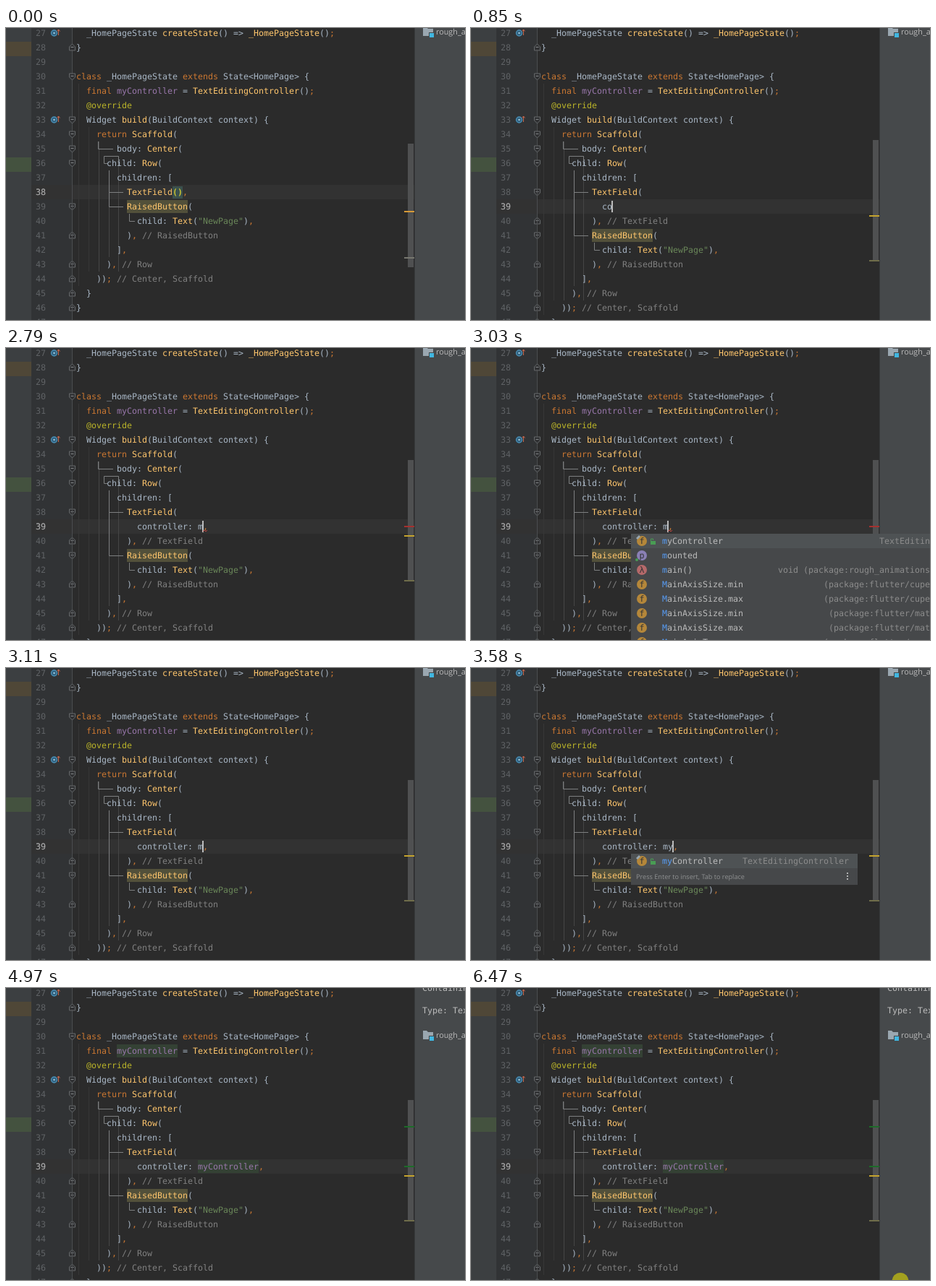
These frames come from a looping animation (634 px wide and 404 px high, 6.6 s). An HTML page:

```html
<!DOCTYPE html>
<html lang="en">
<head>
<meta charset="utf-8">
<title>Editor completion</title>
<style>
  html, body { margin: 0; width: 100%; height: 100%; overflow: hidden; background: #2b2b2b; }
  svg { display: block; width: 634px; height: 404px; }
  text { white-space: pre; text-rendering: geometricPrecision; }
  .mono { font: 11.63px "DejaVu Sans Mono", monospace; }
  .ui { font-family: "Open Sans", sans-serif; }
</style>
</head>
<body>
<svg id="stage" viewBox="0 0 634 404"></svg>
<script>
const LOOP = 6600, CHAR = 7, CODE_X = 97, END = LOOP;
const INK = '#a9b7c6', KEYWORD = '#cc7832', CALL = '#ffc66d', FIELD = '#9876aa', COMMENT = '#808080';
const stage = document.getElementById('stage');
const timed = [];

function add(parent, tag, attrs = {}, content) {
  const el = document.createElementNS('http://www.w3.org/2000/svg', tag);
  for (const key in attrs) el.setAttribute(key, attrs[key]);
  if (content !== undefined) el.textContent = content;
  parent.append(el);
  return el;
}
const rect = (p, x, y, width, height, fill) => add(p, 'rect', { x, y, width, height, fill });
const path = (p, d, stroke, fill = 'none') => add(p, 'path', { d, stroke, fill });
const mono = (p, x, y, str, fill = INK) => add(p, 'text', { x, y, fill, class: 'mono' }, str);
const middle = line => 7 + 20 * (line - 27);

// A group visible only during the given [from, to) spans.
function during(parent, ...spans) {
  const el = add(parent, 'g');
  timed.push({ el, spans });
  return el;
}

const TOKEN = /(\/\/.*)|("[^"]*")|(@\w+)|\b(class|extends|final|return)\b|(\w+(?=\())|([,;])|([^\w"@,;\/]+|\w+|.)/g;
const TOKEN_INK = [COMMENT, '#6a8759', '#bbb529', KEYWORD, CALL, KEYWORD, INK];

function code(parent, line, col, source, inks = {}) {
  const el = mono(parent, CODE_X + col * CHAR, middle(line) + 4, '');
  for (const [word, ...groups] of source.matchAll(TOKEN)) {
    const kind = groups.findIndex(g => g !== undefined);
    add(el, 'tspan', { fill: inks[word] || TOKEN_INK[kind] }, word);
  }
}

function fold(parent, line, isEnd) {
  const y = middle(line), s = isEnd ? -1 : 1;
  path(parent, `M87.5 ${y - 4 * s}h8v${5 * s}l-4 ${4 * s}l-4 ${-4 * s}z`, '#66696b', '#2f3032');
  path(parent, `M89.5 ${y - .5}h4`, '#85888a');
}

function squiggle(parent, from, to) {
  let d = `M${from} 254`;
  for (let x = from + 2, up = true; x <= to; x += 2, up = !up) d += `L${x} ${up ? 252 : 254}`;
  path(parent, d, '#bc3f3c');
}
const mark = (p, y, color) => rect(p, 550, y, 14, 2, color);

// Editor background and side strips
rect(stage, 0, 0, 35, 404, '#3c3f41');
rect(stage, 0, 19, 35, 20, '#4f4737');
rect(stage, 0, 179, 35, 20, '#49544a').setAttribute('fill', '#44523f');
rect(stage, 35, 0, 57, 404, '#313335');

const before = during(stage, [0, 380]), after = during(stage, [380, END]);
rect(before, 35, 217, 529, 20, '#323232');
rect(after, 35, 237, 529, 20, '#323232');
rect(stage, 91, 0, 1, 404, '#4b4d4f');

for (let n = 27; n <= 47; n++) {
  mono(stage, 41, middle(n) + 4, n, '#606366');
}
mono(before, 41, 231, 38, '#a4a3a3');
mono(after, 41, 251, 39, '#a4a3a3');
// Current line number stays above the dim ones
const lineNumbers = add(stage, 'g');
mono(during(lineNumbers, [0, 380]), 41, 231, 38, '#a4a3a3');
mono(during(lineNumbers, [380, END]), 41, 251, 39, '#a4a3a3');

for (const n of [27, 33]) {
  const y = middle(n);
  add(stage, 'circle', { cx: 66.5, cy: y, r: 4, fill: '#2f5f7d', stroke: '#4a8fb5', 'stroke-width': 1.4 });
  add(stage, 'circle', { cx: 66.5, cy: y, r: 1.3, fill: '#9cc4d8' });
  path(stage, `M72.5 ${y + 3}v-8m-2 2.5l2-2.5l2 2.5`, '#c9694f');
}

// Indent guides and widget tree lines
function guides(parent, extra) {
  path(parent, `M100.5 77V${357 + extra}M114.5 137V${337 + extra}`, '#373737');
  path(parent, `M128.5 157V${337 + extra}M155.5 177V${337 + extra}M142.5 197V${317 + extra}`, '#464646');
  path(parent, `M127.5 157V167.5H148M135.5 187.5V177.5H155.5V190M135.5 187.5H140`, '#7d7f80');
  path(parent, `M142.5 197V${247.5 + extra}H162M142.5 227.5H162M170.5 ${257 + extra}V${267.5 + extra}H178`, '#7d7f80');
}
guides(before, 0);
guides(after, 40);

// Identifier highlights, drawn below the code
const usages = during(stage, [4970, END]);
rect(usages, 153, 78, 84, 18, '#344134');
rect(usages, 265, 238, 84, 18, '#344134');

code(stage, 27, 2, '_HomePageState createState() => _HomePageState();');
code(stage, 28, 0, '}');
code(stage, 30, 0, 'class _HomePageState extends State<HomePage> {');
code(stage, 31, 2, 'final myController = TextEditingController();', { myController: FIELD });
code(stage, 32, 2, '@override');
code(stage, 33, 2, 'Widget build(BuildContext context) {');
code(stage, 34, 4, 'return Scaffold(');
code(stage, 35, 8, 'body: Center(');
code(stage, 36, 6, 'child: Row(');
code(stage, 37, 8, 'children: [');

function tail(parent, line) {
  rect(parent, 167, middle(line) - 9, 84, 18, '#52503a');
  code(parent, line, 10, 'RaisedButton(');
  code(parent, line + 1, 12, 'child: Text("NewPage"),');
  code(parent, line + 2, 10, '), // RaisedButton');
  code(parent, line + 3, 8, '],');
  code(parent, line + 4, 6, '), // Row');
  code(parent, line + 5, 4, ')); // Center, Scaffold');
  code(parent, line + 6, 2, '}');
  code(parent, line + 7, 0, '}');
  fold(parent, line, false);
  for (const d of [2, 4, 5, 6, 7]) fold(parent, line + d, true);
}
fold(stage, 28, true);
for (const n of [30, 33, 34, 35, 36]) fold(stage, n, false);

rect(before, 230, 219, 14, 17, '#3b514d');
code(before, 38, 10, 'TextField(),', { '()': '#ffef28' });
tail(before, 39);

code(after, 38, 10, 'TextField(');
code(after, 40, 10, '),');
code(during(after, [460, END]), 40, 13, '// TextField');
tail(after, 41);
const newFolds = during(after, [690, END]);
fold(newFolds, 38, false);
fold(newFolds, 40, true);

// Typed line: start time, text before the caret, text after it
const typing = [
  [380, '', ''], [690, 'c', ''], [850, 'co', ''], [920, 'con', ''], [1070, 'cont', ''],
  [1470, 'controller: ', ','], [2790, 'controller: m', ','], [3430, 'controller: my', ','],
  [3730, 'controller: myC', ','], [3890, 'controller: myCo', ','],
  [4270, 'controller: myController', ','], [4970, 'controller: myController', ',', FIELD]
];
const caret = during(stage, [230, 4970], [5750, 6290]);
const caretBar = rect(caret, 236, 219, 2, 16, '#bbbbbb');
typing.forEach(([start, left, right, ink = INK], i) => {
  const until = i + 1 < typing.length ? typing[i + 1][0] : END;
  code(during(stage, [start, until]), 39, 12, left + right, { myController: ink });
});

squiggle(during(stage, [1800, 2180]), 181, 251);
squiggle(during(stage, [2180, 2790]), 265, 272);
squiggle(during(stage, [2790, 3110]), 272, 279);
squiggle(during(stage, [4520, 4970]), 265, 349);

// Scrollbar and marker stripe
const thumb = rect(stage, 555, 160, 8, 171, '#4f5051');
const oldMarks = during(stage, [0, 460]), newMarks = during(stage, [460, END]);
mark(oldMarks, 253, '#d69a37');
mark(oldMarks, 317, '#77776f');
mark(newMarks, 259, '#c4a32e');
mark(newMarks, 321, '#6f6d4a');
mark(during(stage, [1800, 3110], [4520, 4970]), 246, '#a5312f');
const usageMarks = during(stage, [4970, END]);
mark(usageMarks, 191, '#1d6b29');
mark(usageMarks, 246, '#1d6b29');

// Documentation panel
rect(stage, 564, 0, 70, 404, '#46494b');
rect(stage, 564, 0, 1, 404, '#37393b');
function moduleRow(parent, y) {
  path(parent, `M576 ${y - 6}h5l2 2h7v10h-14z`, 'none', '#9aa7b0');
  rect(parent, 584, y + 1, 7, 7, '#46494b');
  rect(parent, 585, y + 2, 6, 6, '#40b6e0');
  add(parent, 'text', { x: 594, y: y + 4, fill: '#bbbbbb', class: 'ui', 'font-size': 10.8 }, 'rough_animations');
}
moduleRow(during(stage, [0, 4820]), 5);
const docs = during(stage, [4820, END]);
mono(docs, 575, 4, 'Containing class', '#bbbbbb');
mono(docs, 575, 35, 'Type: TextEditingController', '#bbbbbb');
moduleRow(docs, 65);

// Completion popups
const ICONS = { f: '#b5873a', p: '#8a80b5', 'λ': '#b5696a' };

function popupRow(parent, x, row, [icon, label, matchAt, matchLen, type], typeEnd) {
  const y = 267 + 20 * row;
  if (icon) {
    add(parent, 'circle', { cx: x - 28, cy: y, r: 7, fill: ICONS[icon] });
    add(parent, 'text', { x: x - 28, y: y + 4, fill: '#313335', class: 'mono', 'text-anchor': 'middle' }, icon);
    if (label === 'myController') {
      path(parent, `M${x - 36} ${y - 4}l4-4l2 2l-4 4z`, 'none', '#9aa7b0');
      rect(parent, x - 16, y, 7, 5, '#499c54');
      path(parent, `M${x - 15.5} ${y}v-3h3v2`, '#499c54');
    }
    if (icon === 'p') add(parent, 'circle', { cx: x - 35, cy: y + 6, r: 2, fill: '#499c54' });
  }
  const el = mono(parent, x, y + 4, '', '#bbbbbb');
  add(el, 'tspan', {}, label.slice(0, matchAt));
  add(el, 'tspan', { fill: '#589df6' }, label.slice(matchAt, matchAt + matchLen));
  add(el, 'tspan', {}, label.slice(matchAt + matchLen));
  mono(parent, typeEnd - type.length * CHAR, y + 4, type, '#8c8c8c');
}

function popup(spans, left, right, textX, items, hint = true) {
  const g = during(stage, ...spans);
  const bottom = 257 + 20 * items.length;
  rect(g, left, 257, right - left, bottom - 257 + (hint ? 23 : 0), '#46484a');
  rect(g, left, 257, right - left, 20, '#4e5254');
  items.forEach((item, row) => popupRow(g, textX, row, item, right - 12));
  if (!hint) return;
  add(g, 'text', { x: left + 7, y: bottom + 15, fill: '#8f9192', class: 'ui', 'font-size': 9.15 },
    'Press Enter to insert, Tab to replace');
  for (const dy of [7, 11, 15]) rect(g, right - 15, bottom + dy - 1, 2, 2, '#b0b2b3');
}

const TYPE = 'TextEditingController';
const params = n => [
  ['', 'controller:', 0, n, TYPE],
  ['', 'scrollController:', 6, n, 'ScrollController']
];
popup([[920, 1070]], 174, 674, 180, params(3));
popup([[1070, 1470]], 174, 674, 180, params(4));

const axisItem = (name, lib) => ['f', 'MainAxisSize.' + name, 0, 1, `(package:flutter/${lib}.dart)`];
popup([[2870, 3110]], 221, 723, 264, [
  ['f', 'myController', 0, 1, TYPE],
  ['p', 'mounted', 0, 1, ''],
  ['λ', 'main()', 0, 1, 'void (package:rough_animations/main.dart)'],
  axisItem('min', 'cupertino'), axisItem('max', 'cupertino'),
  axisItem('min', 'material'), axisItem('max', 'material'),
  ['f', 'MainAxisType', 0, 1, '(package:flutter/cupertino.dart)']
], false);

const field = n => [['f', 'myController', 0, n, TYPE]];
popup([[3580, 3660]], 221, 534, 264, field(2));
popup([[3660, 3730]], 221, 723, 264, field(2));
popup([[3730, 3890]], 221, 723, 264, field(3));
popup([[3890, 4270]], 221, 723, 264, field(4));

// Pointer halo: start time, centre
const halo = add(stage, 'circle', { r: 11.5, fill: '#a3a01f' });
const haloSteps = [[0], [5980, 602, 394.5], [6060, 602, 405], [6140], [6380, 593, 411], [6470, 593, 405.5]];
const latest = (steps, t) => steps.filter(step => step[0] <= t).pop();

function render(t) {
  for (const { el, spans } of timed) {
    const on = spans.some(([from, to]) => t >= from && t < to);
    el.setAttribute('display', on ? 'inline' : 'none');
  }
  const typed = latest(typing, t);
  caretBar.setAttribute('x', typed ? 180 + typed[1].length * CHAR : 236);
  caretBar.setAttribute('y', typed ? 239 : 219);
  thumb.setAttribute('y', typed ? 155 : 160);
  thumb.setAttribute('height', typed ? 167 : 171);
  const [, x, y] = latest(haloSteps, t);
  halo.setAttribute('cx', x || -50);
  halo.setAttribute('cy', y || -50);
}

const began = performance.now();
function tick() {
  render((performance.now() - began) % LOOP);
  requestAnimationFrame(tick);
}
tick();
</script>
</body>
</html>
```
